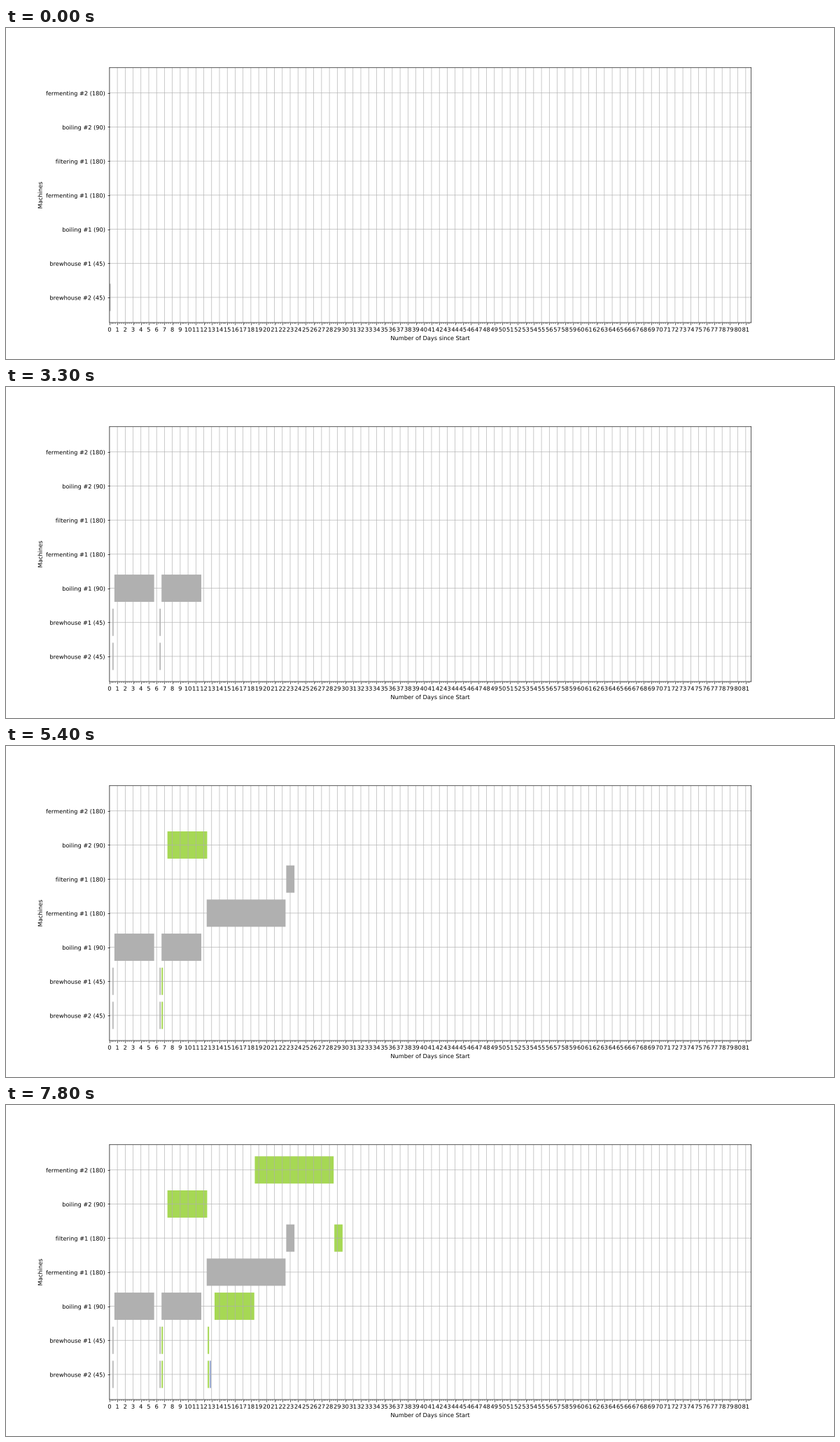
A matplotlib script that plays this animation: 1183 px wide and 473 px high, repeating every 8000 ms.

```python
import matplotlib.pyplot as plt
from matplotlib.animation import FuncAnimation
from matplotlib.patheffects import Normal
from matplotlib.ticker import MultipleLocator

W, H, DPI = 1183, 473, 59.15
TICK_MS, LOOP_MS, STEP_MS = 100, 8000, 300

GRAY, GREEN, BLUE = "#b0b0b0", "#a6d854", "#8da0cb"
BREW2, BREW1, BOIL1, FERM1, FILT1, BOIL2, FERM2 = range(7)
MACHINES = ["brewhouse #2 (45)", "brewhouse #1 (45)", "boiling #1 (90)",
            "fermenting #1 (180)", "filtering #1 (180)", "boiling #2 (90)",
            "fermenting #2 (180)"]
BOIL, FERM, FILT = 5.06, 10.04, 1.05

# machine, colour, duration, successive start days (one step each)
JOBS = [
    (BREW2, GRAY, 0.14, [0, 0.375]),
    (BREW1, GRAY, 0.14, [0, 0.375]),
    (BOIL1, GRAY, BOIL, [0, 0.625]),
    (BREW2, GRAY, 0.14, [5.7, 6.375]),
    (BREW1, GRAY, 0.14, [5.7, 6.375]),
    (BOIL1, GRAY, BOIL, [5.7, 6.625]),
    (FERM1, GRAY, FERM, [5.7, 12.375]),
    (FILT1, GRAY, FILT, [22.5]),
    (BREW2, GREEN, 0.18, [6.625]),
    (BREW1, GREEN, 0.18, [6.625]),
    (BOIL2, GREEN, BOIL, [0, 7.375]),
    (BREW2, GREEN, 0.18, [12.5]),
    (BREW1, GREEN, 0.18, [12.5]),
    (BOIL1, GREEN, BOIL, [12.54, 13.375]),
    (FERM2, GREEN, FERM, [12.42, 18.5]),
    (FILT1, GREEN, FILT, [28.625]),
    (BREW2, BLUE, 0.15, [12.77]),
]

plt.rcParams.update({"font.family": "DejaVu Sans", "font.size": 10,
                     "path.snap": False})
fig, ax = plt.subplots(figsize=((W + 0.01) / DPI, (H + 0.01) / DPI), dpi=DPI)
ax.set_xlim(0, 81.7)
ax.set_ylim(-0.74, 6.74)
ax.set_xticks(range(82))
ax.xaxis.set_minor_locator(MultipleLocator(0.25))
ax.set_yticks(range(len(MACHINES)), MACHINES)
ax.set_xlabel("Number of Days since Start")
ax.set_ylabel("Machines")
ax.grid(True)

# draw text as outlines so it sits at sub-pixel positions
for text in fig.findobj(plt.Text):
    text.set_path_effects([Normal()])

bars = []
first = 0
for row, color, days, starts in JOBS:
    bar = plt.Rectangle((0, row - 0.4), days, 0.8, fc=color, lw=0)
    ax.add_patch(bar)
    bars.append((bar, first, starts))
    first += len(starts)


def update(i):
    step = i * TICK_MS // STEP_MS
    for bar, first, starts in bars:
        bar.set_visible(step >= first)
        bar.set_x(starts[min(max(step - first, 0), len(starts) - 1)])
    return [bar for bar, _, _ in bars]


anim = FuncAnimation(fig, update, frames=LOOP_MS // TICK_MS,
                     interval=TICK_MS, repeat=True, repeat_delay=0)
plt.show()
```
